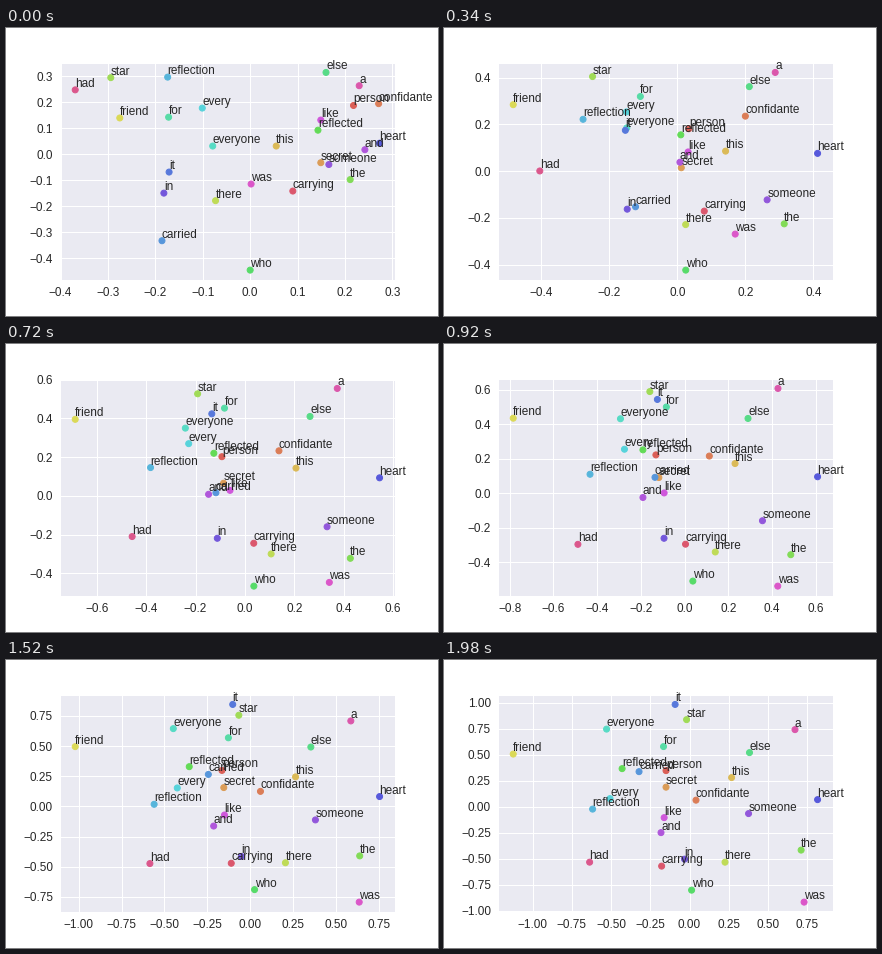
These frames come from a looping animation (432 px wide and 288 px high, 2000 ms). A matplotlib script:

```python
import colorsys

import matplotlib.pyplot as plt
import numpy as np
from matplotlib.animation import FuncAnimation

FRAMES, STEP = 100, 20  # 20 ms per frame, 2 s per loop
INK = "0.15"

plt.rcParams.update({
    "font.family": "Liberation Sans",
    "font.size": 11.7,
    "text.color": INK,
    "xtick.labelcolor": INK,
    "ytick.labelcolor": INK,
})

words, starts, ends, bends = [], [], [], []


def track(word, start, end, via=None):
    """Add a word that glides from start to end, in thousandths.

    The path is straight, or an arc through via at its middle.
    """
    start, end = np.array(start) / 1000, np.array(end) / 1000
    middle = (start + end) / 2
    words.append(word)
    starts.append(start)
    ends.append(end)
    bends.append(0 * middle if via is None else np.array(via) / 1000 - middle)


# In the order of their hues
track("person", (218, 187), (-150, 346), via=(-105, 207))
track("confidante", (271, 194), (41, 62), via=(131, 229))
track("secret", (149, -33), (-150, 187), via=(-96, 72))
track("this", (55, 31), (268, 279), via=(214, 151))
track("friend", (-275, 139), (-1124, 505), via=(-714, 407))
track("there", (-73, -179), (226, -534), via=(116, -311))
track("star", (-294, 294), (-19, 836), via=(-183, 544))
track("the", (211, -98), (711, -418), via=(443, -333))
track("reflected", (143, 92), (-430, 365))
track("who", (0, -446), (13, -803), via=(37, -477))
track("else", (160, 314), (382, 519))
track("for", (-172, 142), (-166, 577), via=(-82, 467))
track("everyone", (-79, 31), (-529, 745), via=(-255, 372))
track("every", (-101, 177), (-507, 77), via=(-240, 267))
track("reflection", (-174, 296), (-618, -24))
track("carried", (-186, -333), (-322, 336), via=(-121, 37))
track("it", (-171, -69), (-92, 982))
track("heart", (273, 42), (816, 67), via=(563, 94))
track("in", (-182, -150), (-32, -505), via=(-107, -230))
track("someone", (166, -40), (376, -67), via=(340, -161))
track("and", (242, 17), (-182, -250), via=(-161, 0))
track("like", (149, 131), (-162, -106), via=(-70, 21))
track("was", (2, -115), (730, -918), via=(365, -472))
track("a", (230, 263), (672, 740), via=(388, 570))
track("had", (-369, 247), (-637, -534), via=(-465, -235))
track("carrying", (90, -142), (-178, -572), via=(28, -258))

starts, ends, bends = map(np.array, (starts, ends, bends))


def place(i):
    """Positions of all words, easing out towards the last frame."""
    s = 1 - (1 - i / (FRAMES - 1)) ** 1.4
    return starts + (ends - starts) * s + bends * 4 * s * (1 - s)


n = len(words)
colors = [colorsys.hls_to_rgb(0.01 + i / n, 0.6, 0.65) for i in range(n)]

fig = plt.figure(figsize=(6, 4), dpi=72, facecolor="white")
fig.subplots_adjust(left=0.125, right=0.9, bottom=0.125, top=0.88)
ax = fig.add_subplot(facecolor="#eaeaf2")
ax.set_axisbelow(True)
ax.grid(color="white", linewidth=1)
ax.tick_params(length=0, pad=7)
ax.spines[:].set(color="white", linewidth=1)

dots = ax.scatter(*starts.T, s=36, c=colors, linewidths=1)
labels = [ax.text(0, 0, w, ha="left", va="bottom") for w in words]


def update(i):
    xy = place(i)
    dots.set_offsets(xy)
    for label, p in zip(labels, xy):
        label.set_position(p)
    low, high = xy.min(axis=0), xy.max(axis=0)
    pad = 0.05 * (high - low)
    ax.set_xlim(low[0] - pad[0], high[0] + pad[0])
    ax.set_ylim(low[1] - pad[1], high[1] + pad[1])
    return [dots, *labels]


anim = FuncAnimation(fig, update, frames=FRAMES, interval=STEP,
                     init_func=lambda: update(0), repeat=True, repeat_delay=0)
plt.show()
```
